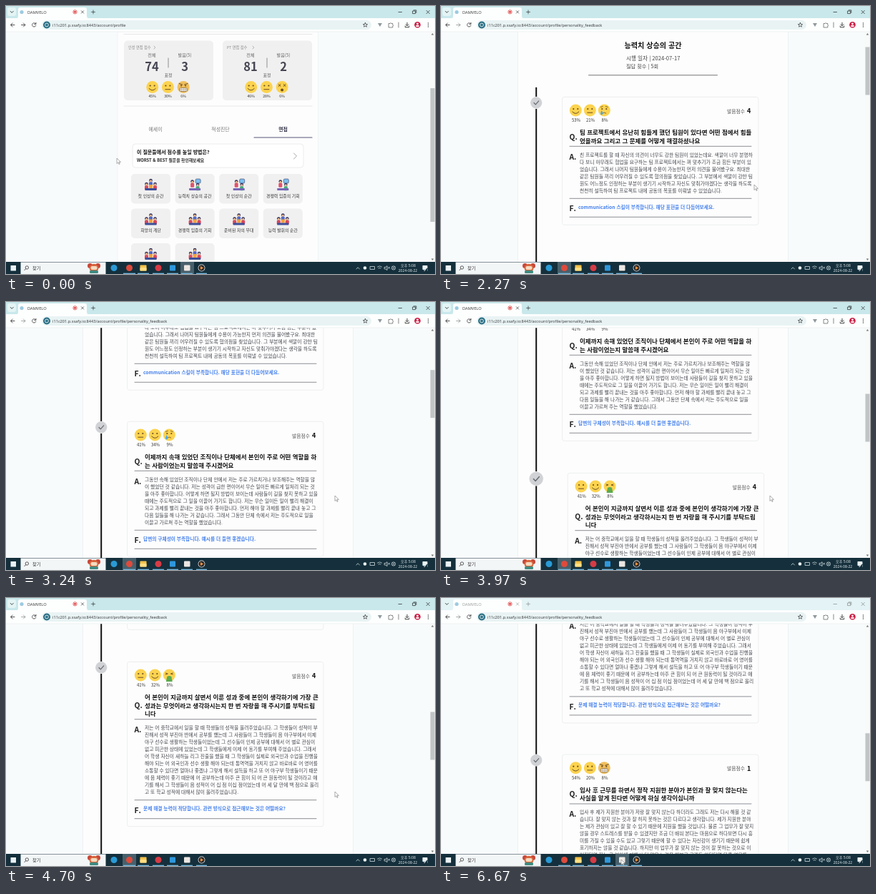
Animation of 600 by 375 pixels, one loop 6.7 s. Source, as an HTML page:

```html
<!DOCTYPE html>
<html lang="ko">
<head>
<meta charset="utf-8">
<style>
html, body { margin: 0; width: 100%; height: 100%; overflow: hidden; background: #fff; }
svg { display: block; width: 600px; height: 375px; font-family: "Noto Sans CJK KR", "Noto Sans CJK", "Noto Sans", sans-serif; }
.ui { font-family: "Open Sans", "Noto Sans CJK KR", sans-serif; }
text { white-space: pre; }
</style>
</head>
<body>
<svg id="stage" viewBox="0 0 600 375"></svg>
<script>
const LOOP = 6700, NAV = 760, LOAD = 1450, BLUR = 6350, BRAND = 'DAMVELO';
const $ = id => document.getElementById(id);

// Drawing helpers; text is placed by its vertical centre.
const text = (x, y, size, str, o = {}) =>
  `<text x="${x}" y="${y + size * .37}" font-size="${size}" font-weight="${o.w || 400}" fill="${o.f || '#333'}" text-anchor="${o.a || 'start'}"${o.id ? ` id="${o.id}"` : ''}>${str.replace(/&/g, '&amp;')}</text>`;
const mid = (x, y, size, str, o = {}) => text(x, y, size, str, { ...o, a: 'middle' });
const rect = (x, y, w, h, fill, r = 0, more = '') =>
  `<rect x="${x}" y="${y}" width="${w}" height="${h}" rx="${r}" fill="${fill}" ${more}/>`;
const dot = (x, y, r, fill, more = '') => `<circle cx="${x}" cy="${y}" r="${r}" fill="${fill}" ${more}/>`;
const line = (d, color = '#444', w = 1, more = '') =>
  `<path d="${d}" fill="none" stroke="${color}" stroke-width="${w}" stroke-linecap="round" stroke-linejoin="round" ${more}/>`;
const group = (id, body, more = '') => `<g id="${id}" ${more}>${body}</g>`;

const INK = '#6b4c24';
const eyes = dot(-3, -2, 1.1, INK) + dot(3, -2, 1.1, INK);
const faces = {
  smile: eyes + line('M-4.5 2Q0 7 4.5 2', INK, 1),
  flat: eyes + line('M-3.5 3.2H3.5', INK, 1),
  cry: eyes + line('M-2.5 4Q0 2 2.5 4M-5-4.5L-2-5.5M5-4.5L2-5.5', INK, .8) +
    '<path d="M-3.5 0Q-7 5.5-3.5 6.5Q-.5 5.5-3.5 0" fill="#4aa9e8"/>',
  angry: rect(-5, 1, 10, 5, '#fff', 1.5, `stroke="${INK}" stroke-width=".6"`) +
    line('M-2.5 1V6M0 1V6M2.5 1V6M-5 3.5H5', INK, .4) + eyes + line('M-6-5L-1.5-3.5M6-5L1.5-3.5', INK, 1),
  dizzy: line('M-5-4L-2-1M-2-4L-5-1M5-4L2-1M2-4L5-1', INK, 1) + dot(0, 4, 2, INK),
  sick: line('M-5-3L-2-2L-5-1M5-3L2-2L5-1', INK, .9) +
    '<path d="M-3 2Q0 0 3 2L4.5 9H-4.5Z" fill="#5cab50"/>'
};
const emoji = (kind, x, y) =>
  `<g transform="translate(${x} ${y})">${dot(0, 0, 8.5, kind === 'angry' ? '#f0bf5c' : '#fcd34f')}${faces[kind]}</g>`;

// Profile page
function scoreCard(x, title, total, voice, kinds, percents) {
  const grey = { f: '#666' }, bold = { w: 700, f: '#454552' };
  return rect(x, 48.5, 125, 83.5, '#f0f0f0', 5) +
    text(x + 6, 58, 5.2, title, { f: '#888' }) + line(`M${x + 42} 56l1.8 2-1.8 2`, '#888', .6) +
    mid(x + 39, 69, 6.2, '전체', grey) + mid(x + 85, 69, 6.2, '발음(5)', grey) +
    line(`M${x + 62} 73v13`, '#777', .8) + mid(x + 39, 84.5, 16.5, total, bold) + mid(x + 85, 84.5, 16.5, voice, bold) +
    mid(x + 62, 97, 6, '표정', { f: '#555' }) +
    kinds.map((k, i) => emoji(k, x + 39.7 + i * 21.7, 113.5) + mid(x + 39.7 + i * 21.7, 126, 5.2, percents[i] + '%')).join('');
}
const person = (x, y, shirt) => dot(x, y, 2.3, '#34335c') + dot(x, y + .7, 1.5, '#f6bd8c') + rect(x - 2.5, y + 2.3, 5, 6, shirt, 1.3);
function badge(x, y, pair) {
  const art = pair
    ? rect(1, -8, 7, 6, '#7cc0f0', 1.5, 'stroke="#34335c" stroke-width=".6"') + person(-3.5, -4.5, '#e0526a') + person(4, 0, '#43a878')
    : person(0, -6, '#5269c8') + person(-6, -1, '#d9485d') + person(6, -1, '#d9485d') + rect(-2.5, 0, 5, 5, '#f4a23c');
  return `<g transform="translate(${x} ${y})">${art}${rect(-8, 5, 16, 3, pair ? '#7567b5' : '#3e4f9a', .6)}</g>`;
}
const labels = ['첫 인상의 순간', '능력치 상승의 공간', '첫 인상의 순간', '경쟁력 입증의 기회', '희망의 계단',
  '경쟁력 입증의 기회', '준비된 자의 무대', '능력 발휘의 순간', '', ''];
const cells = labels.map((s, i) => {
  const x = 175 + i % 4 * 61.6, y = 235 + (i >> 2) * 48.5;
  return rect(x, y, 55, 41.5, '#f0f0f0', 5) + badge(x + 27.5, y + 15, i > 0 && i < 4) + mid(x + 27.5, y + 30.5, 5.9, s);
}).join('');
const profile = rect(0, 36, 600, 322, '#f8fbfc') + rect(156, 36, 280.5, 322, '#fdfdfd', 0, 'stroke="#eceef0" stroke-width=".6"') +
  line('M165 39.5H428M165 140H428', '#e2e2e2', .8) +
  scoreCard(165, '인성 면접 점수', '74', '3', ['smile', 'flat', 'angry'], [45, 30, 6]) +
  scoreCard(303, 'PT 면접 점수', '81', '2', ['smile', 'flat', 'dizzy'], [46, 28, 6]) +
  mid(209, 172, 6.9, '에세이', { f: '#777' }) + mid(300, 172, 6.9, '적성진단', { f: '#777' }) +
  mid(387.5, 172, 6.9, '면접', { w: 700, f: '#333348' }) + line('M347 184H428', '#56567c', 1.2) +
  rect(177, 193, 239, 33, '#fff', 4, 'stroke="#e8e8e8" stroke-width=".8"') +
  text(183, 204.5, 7, '이 질문들에서 점수를 높일 방법은?', { w: 700, f: '#111' }) +
  text(183, 215.5, 5.8, 'WORST & BEST 질문을 확인해보세요', { w: 600, f: '#222' }) +
  line('M402.5 206l4 4-4 4', '#999', .9) + cells;

// Feedback page
const reviews = [
  { top: 197.5, start: LOAD, kinds: ['smile', 'flat', 'cry'], pct: [53, 21, 8], score: '4',
    q: ['팀 프로젝트에서 유난히 힘들게 했던 팀원이 있다면 어떤 점에서 힘들', '었을까요 그리고 그 문제를 어떻게 해결하셨나요'],
    a: ['친 프로젝트를 할 때 자신의 의견이 너무도 강한 팀원이 있었는데요. 색깔이 너무 분명하',
      '다 보니 아무래도 협업을 요구하는 팀 프로젝트에서는 꺼 맞추기가 조금 힘든 부분이 있',
      '었습니다. 그래서 나머지 팀원들에게 수용이 가능한지 먼저 의견을 물어봤구요. 최대한',
      '같은 팀원들 끼리 어우러질 수 있도록 협의점을 찾았습니다. 그 부분에서 색깔이 강한 팀',
      '원도 어느정도 인정하는 부분이 생기기 시작하고 자신도 맞춰가야겠다는 생각을 하도록',
      '천천히 설득하여 팀 프로젝트 내에 공동의 목표를 이뤄낼 수 있었습니다.'],
    f: 'communication 스킬이 부족합니다. 해당 표현을 더 다듬어보세요.' },
  { top: 420.5, start: 2390, kinds: ['flat', 'smile', 'cry'], pct: [41, 34, 9], score: '4',
    q: ['이제까지 속해 있었던 조직이나 단체에서 본인이 주로 어떤 역할을 하', '는 사람이었는지 말씀해 주시겠어요'],
    a: ['그동안 속해 있었던 조직이나 단체 안에서 저는 주로 가르치거나 보조해주는 역할을 많',
      '이 했었던 것 같습니다. 저는 성격이 급한 편이어서 무슨 일이든 빠르게 일처리 되는 것',
      '을 아주 좋아합니다. 어떻게 하면 될지 방법이 보이는데 사람들이 길을 찾지 못하고 있을',
      '때에는 주도적으로 그 일을 이끌어 가기도 합니다. 저는 무슨 일이든 일이 빨리 해결이',
      '되고 과제를 빨리 끝내는 것을 아주 좋아합니다. 먼저 해야 할 과제를 빨리 끝내 놓고 그',
      '다음 일들을 해 나가는 거 같습니다. 그래서 그동안 단체 속에서 저는 주도적으로 일을',
      '이끌고 가르쳐 주는 역할을 했었습니다.'],
    f: '답변의 구체성이 부족합니다. 예시를 더 들면 좋겠습니다.' },
  { top: 654.5, start: 3610, kinds: ['flat', 'smile', 'sick'], pct: [41, 32, 8], score: '4',
    q: ['어 본인이 지금까지 살면서 이룬 성과 중에 본인이 생각하기에 가장 큰', '성과는 무엇이라고 생각하시는지 한 번 자랑을 해 주시기를 부탁드립', '니다'],
    a: ['저는 어 중학교에서 일을 할 때 학생들의 성적을 올려주었습니다. 그 학생들이 성적이 부',
      '진해서 성적 부진아 반에서 공부를 했는데 그 사람들이 그 학생들이 음 야구부에서 이제',
      '야구 선수로 생활하는 학생들이었는데 그 선수들이 인제 공부에 대해서 어 별로 관심이',
      '없고 피곤한 상태에 있었는데 그 학생들에게 이제 어 동기를 부여해 주었습니다. 그래서',
      '어 학생 자신이 새하늘 리그 진출을 했을 때 그 학생들이 실제로 외국인과 수업을 진행을',
      '해야 되는 어 외국인과 선수 생활 해야 되는데 통역역을 거치지 않고 바로바로 어 영어를',
      '소통할 수 있다면 얼마나 좋겠냐 그렇게 해서 설득을 하고 또 어 야구부 학생들이기 때문',
      '에 음 체력이 좋기 때문에 어 공부하는데 아주 큰 힘이 되 어 큰 원동력이 될 것이라고 얘',
      '기를 해서 그 학생들이 음 성적이 어 십 점 이십 점이었는데 어 세 달 만에 백 점으로 올리',
      '고 또 학교 성적에 대해서 많이 올려주었습니다.'],
    f: '문제 해결 능력이 적당합니다. 관련 방식으로 접근해보는 것은 어떨까요?' },
  { top: 929, start: 4890, kinds: ['smile', 'flat', 'angry'], pct: [54, 20, 8], score: '1',
    q: ['입사 후 근무를 하면서 정작 지원한 분야가 본인과 잘 맞지 않는다는', '사실을 알게 된다면 어떻게 하실 생각이십니까'],
    a: ['입사 후 제가 지원한 분야가 저랑 잘 맞지 않는다 하더라도 그래도 저는 다시 해볼 것 같',
      '습니다. 잘 맞지 않는 것과 잘 하지 못하는 것은 다르다고 생각합니다. 제가 지원한 분야',
      '는 제가 관심이 있고 잘 할 수 있기 때문에 지원을 했을 것입니다. 물론 그 업무가 잘 맞지',
      '않을 경우 스트레스를 받을 수 있겠지만 조금 더 배워 본다는 마음으로 하다보면 다시 흥',
      '미를 가질 수 있을 수도 있고 그렇기 때문에 할 수 있다는 자신감이 생기기 때문에 쉽게',
      '포기하지는 않을 것 같습니다. 하지만 이 업무가 잘 맞지 않는 것이 잘 못하는 것으로 이',
      '어진다면 저는 그 분야에 대해서 더 많은 노력을 해보고 그래도 안된다면 다른 업무를'],
    f: '' }
];
function review(r, i) {
  const qEnd = 69 + (r.q.length - 2) * 11.4, a0 = qEnd + 12, aEnd = a0 + r.a.length * 10 + 1;
  const rule = y => line(`M180 ${y}H434`, '#5c5f68', .7);
  const letter = (y, c) => text(179.5, y, 10.3, c, { w: 700, f: '#222' });
  const body = rect(169.5, 0, 274.5, aEnd + 37, '#fdfdfd', 3, 'stroke="#e6e8ea" stroke-width=".7"') +
    r.kinds.map((k, j) => emoji(k, 188.3 + j * 20, 18.7) + mid(189 + j * 20, 32.8, 6, r.pct[j] + '%', { w: 500 })).join('') +
    text(400, 19.8, 6.8, '발음점수', { f: '#555' }) + text(428, 19.5, 9, r.score, { w: 700, f: '#111' }) +
    letter(55.5 + (r.q.length - 2) * 5.7, 'Q.') +
    r.q.map((s, j) => text(194, 49.7 + j * 11.4, 8.5, s, { w: 600, f: '#111' })).join('') + rule(qEnd) +
    letter(a0 + 2.5, 'A.') + r.a.map((s, j) => text(194, a0 + j * 10, 6.75, s, { f: '#44464d' })).join('') + rule(aEnd) +
    letter(aEnd + 14, 'F.') + text(192, aEnd + 12, 6.7, r.f, { w: 600, f: '#4580ec' }) + rule(aEnd + 26);
  const tick = dot(0, 0, 8.6, '#f4f5f6') + dot(0, 0, 8, '#d0d2d5') + line('M-3.2 .2L-.9 2.6L3.5-2.4', '#666a70', 1.2);
  return group('card' + i, body) + group('tick' + i, tick);
}
const nav = [[253, '1차 전형 준비'], [310, '2차 전형 준비'], [390, '프로필'], [427, '로그아웃']];
const feedback = rect(0, 36, 600, 1500, '#f8fbfc') + rect(0, 36, 600, 41, '#fdfdfd') + line('M0 77H600', '#e6eaed', .7) +
  dot(142, 56.5, 5.5, '#8cc5e2') + text(153, 56, 10, BRAND, { w: 700, f: '#111' }) +
  nav.map(([x, s]) => text(x, 56, 6.8, s, { w: 600, f: '#222' })).join('') +
  rect(107.5, 95, 378, 257, '#e2e7ea', 4, 'id="shade"') + rect(108, 94, 377, 257, '#fdfdfd', 4, 'id="panel"') +
  mid(296.5, 125, 10.1, '능력치 상승의 공간', { w: 700, f: '#111' }) +
  text(259, 143, 7.6, '시행 일자 | 2024-07-17', { w: 300, f: '#444' }) +
  text(259, 155, 7.2, '', { w: 300, f: '#444', id: 'count' }) + line('M206.5 167H386.5', '#666', .9) +
  rect(132.2, 184, 2, 54, '#111', 0, 'id="rail"') + reviews.map(review).join('');

// Browser frame and taskbar
const chrome = rect(0, 0, 600, 17.5, '#c9e8eb', 0, 'id="strip"') + rect(2, 2, 12, 12, '#e4f4f5', 3) + line('M6.2 7.4l2 2 2-2', '#333', .9) +
  '<path d="M14 17.5Q17 17 17 14V5Q17 2 20 2H110Q113 2 113 5V14Q113 17 116 17.5Z" fill="#fdfefe"/>' +
  rect(0, 17, 600, 19, '#fdfefe') + dot(22, 8.5, 2.6, '#9dcbe0') +
  dot(96.5, 8.3, 2.6, '#fff', 'stroke="#d33" stroke-width=".8"') + dot(96.5, 8.3, 1.4, '#d33') +
  group('controls', text(30, 8.5, 5.7, BRAND) +
    line('M105.3 6.7l3.4 3.4M108.7 6.7l-3.4 3.4M119.5 8.4h5M122 5.9v5', '#333', .7) +
    line('M549 8.5h4.5M588 6.3l4.4 4.4M592.4 6.3l-4.4 4.4M569 7h3.6v3.6H569ZM570 6V5.8h3.8V9.5', '#222', .7)) +
  line('M12 26.5H6.7M9 24l-2.4 2.5L9 29M41.6 25A2.7 2.7 0 1 0 41.8 27.4M41.9 23.3V25.4H39.8', '#444', .9) +
  line('M21.5 26.5h5.3M24.4 24l2.4 2.5-2.4 2.5', '#444', .9, 'id="forward"') +
  rect(50, 20, 461, 13, '#e9f3f4', 6.5) + dot(57, 26.5, 5, '#2d7186') + dot(57, 26.5, 2.4, 'none', 'stroke="#fff" stroke-width=".8"') +
  text(65, 26.5, 5.65, '', { id: 'url', f: '#333' }) +
  line('M502.5 23.4l.9 2 2.2.2-1.7 1.5.5 2.1-1.9-1.1-1.9 1.1.5-2.1-1.7-1.5 2.2-.2Z', '#333', .7) +
  '<path d="M520 24h6l-3 5Z" fill="#8f999d"/>' + line('M535.5 24.5h1.7q.8-2 1.6 0h2v2q2 .7 0 1.5v2h-5.3ZM549 23v7', '#555', .7) +
  line('M561 23.2v4.3M559 25.7l2 2 2-2M558.3 28v1.8h5.4V28', '#333', .9) + dot(575.5, 26.3, 4.3, '#c91f45') +
  dot(575.5, 25, 1.4, '#fff') + rect(573.1, 27, 4.8, 2, '#fff', 1) +
  dot(590.5, 24, .7, '#333') + dot(590.5, 26.5, .7, '#333') + dot(590.5, 29, .7, '#333') + line('M0 36H600', '#dce7e8', .5);
const apps = dot(151, 366.5, 4.5, '#2a9bd6') + dot(172.5, 366.5, 4.5, '#de4b3c') +
  rect(187.5, 362.5, 9, 8, '#f4c24a', .8) + rect(187.5, 366, 9, 4.5, '#ffdf83', .6) +
  dot(213, 366.5, 4.5, '#d73b45') + rect(229, 362.5, 8, 8, '#2f97dd', 1) + rect(249, 362.5, 8.5, 8, '#ece6e2', 1) +
  dot(273.5, 366.5, 4.9, '#f0f0f0') + dot(273.5, 366.5, 4.2, '#2b2b2b') + '<path d="M272 364l4 2.5-4 2.5Z" fill="#ff943b"/>';
const SKY = '#eaf2f5', BAR = '#15303c', light = { f: SKY };
const taskbar = rect(0, 358, 600, 17, BAR) + rect(6.5, 363, 7.5, 7.5, SKY) +
  rect(20.5, 358.5, 119, 16.5, '#f3f6f7') +
  dot(29.3, 366, 2.2, 'none', 'stroke="#333" stroke-width=".8"') + line('M27.7 367.7L25.8 369.7', '#333', .8) + text(37, 366.5, 6.2, '찾기') +
  dot(117.5, 363.5, 3.5, '#c8473a') + dot(128.5, 363.5, 3.5, '#c8473a') + dot(123, 367, 6.3, '#d8663c') +
  rect(118.5, 364, 9, 5, '#f3dcc0', 2) + rect(117, 370, 12, 4, '#3f8a80', 1.5) +
  rect(163, 358, 19, 17, '#48606b', 0, 'id="active"') +
  [[164, 17], [184, 16], [205, 16], [225, 16], [245, 16], [266, 15]].map(([x, w]) => rect(x, 373.7, w, 1.3, '#76b9e0')).join('') + apps +
  line('M490 368l2.2-2.3 2.2 2.3M509.5 364.5h6v4h-6ZM519.5 365q3-2.4 6 0M521 367q1.5-1.2 3 0M529.5 365.5h1.5l2-1.8v6l-2-1.8h-1.5ZM534.5 365.2l2.2 2.2M536.7 365.2l-2.2 2.2', SKY, .7) +
  dot(502, 366.5, 2.3, SKY) + dot(542, 366.5, 2.6, 'none', `stroke="${SKY}" stroke-width=".7"`) + line('M540.5 365l3 3M543.5 365l-3 3', SKY, .6) +
  mid(562.5, 362.8, 5.1, '오후 5:08', light) + mid(562, 370.5, 5.1, '2024-08-22', light) +
  rect(582.5, 363, 7, 6, SKY, .7) + line('M585 369v2l2-2', SKY, .7) + dot(589.5, 369.5, 2.5, BAR) + mid(589.5, 369.5, 4, '1', light);
const scrollbar = rect(593, 36, 7, 322, '#f8f9f9') + rect(593.5, 43, 6, 10, '#c1c4c5', 0, 'id="thumb"') +
  '<path d="M594.7 40.5l1.8-2.4 1.8 2.4ZM594.7 353.5l1.8 2.4 1.8-2.4Z" fill="#777"/>';
const arrow = '<path d="M0 0V7.5L1.8 5.8L3 8.5L4.2 8L3 5.4H5.4Z" fill="#fff" stroke="#777" stroke-width=".6"/>';

$('stage').innerHTML =
  '<clipPath id="view"><rect y="36" width="600" height="322"/></clipPath>' +
  `<g clip-path="url(#view)">${group('profile', profile)}${group('feedback', feedback)}${scrollbar}</g>` +
  group('frame', chrome + taskbar, 'class="ui"') +
  group('arrow', arrow) + group('beam', line('M-1.6-3.5H1.6M0-3.5V3.5M-1.6 3.5H1.6', '#222', .8));

// Motion
const smooth = u => u * u * (3 - 2 * u), linear = u => u;
function along(keys, t, ease, col = 1) {
  const i = keys.findIndex(k => k[0] > t);
  if (i < 0) return keys[keys.length - 1][col];
  if (!i) return keys[0][col];
  const a = keys[i - 1], b = keys[i];
  return a[col] + (b[col] - a[col]) * ease((t - a[0]) / (b[0] - a[0]));
}
const scrollKeys = [[1850, 0], [2270, 70], [3240, 253], [3970, 415], [4700, 565], [5430, 710]];
const mouseKeys = [[60, 155, 213], [650, 269, 254.5], [1400, 269, 254.5], [2050, 438, 250], [2500, 438, 250],
  [3050, 460, 271], [5640, 460, 271], [6200, 252, 366]];
const show = (id, on) => $(id).setAttribute('visibility', on ? 'inherit' : 'hidden');
const set = (id, name, value) => $(id).setAttribute(name, value);
const easeOut = u => 1 - (1 - u) ** 2.2;
const bounce = (age, from, over, rest) => along([[0, from], [360, over], [600, rest]], age, easeOut);

function draw(t) {
  const onFeedback = t >= NAV, loaded = t >= LOAD, blurred = t >= BLUR, y = along(scrollKeys, t, linear);
  show('profile', !onFeedback);
  show('feedback', onFeedback);
  set('feedback', 'transform', `translate(0 ${-y})`);
  $('url').textContent = 'i11c201.p.ssafy.io:8443/account/profile' + (onFeedback ? '/personality_feedback' : '');
  $('count').textContent = `질답 횟수 | ${loaded ? 5 : 0}회`;
  set('forward', 'opacity', onFeedback ? .5 : 1);
  set('strip', 'fill', blurred ? '#e4f3f5' : '#c9e8eb');
  set('controls', 'opacity', blurred ? .5 : 1);
  set('panel', 'height', loaded ? 1420 : 257);
  set('shade', 'height', loaded ? 1420 : 257);
  set('rail', 'height', loaded ? 1300 : 54);

  reviews.forEach((r, i) => {
    const age = t - r.start, alive = age >= 0, fade = Math.min(1, Math.max(0, age) / 360);
    for (const id of ['card' + i, 'tick' + i]) {
      show(id, alive);
      set(id, 'opacity', fade);
    }
    set('card' + i, 'transform', `translate(${bounce(age, -39, 7.8, 0)} ${r.top})`);
    set('tick' + i, 'transform', `translate(133.2 ${r.top + 8}) scale(${bounce(age, .5, 1.2, 1)})`);
  });

  set('thumb', 'y', !onFeedback ? 115 : 43 + y * .206);
  set('thumb', 'height', !onFeedback ? 187 : loaded ? 67 : 308);
  set('active', 'x', t > 650 && !blurred ? 163 : 244);

  const place = `translate(${along(mouseKeys, t, smooth)} ${along(mouseKeys, t, smooth, 2)})`;
  const beam = onFeedback && t < 1420;
  show('arrow', !beam);
  show('beam', beam);
  set('arrow', 'transform', place);
  set('beam', 'transform', place);
}
function tick() {
  draw(performance.now() % LOOP);
  requestAnimationFrame(tick);
}
tick();
</script>
</body>
</html>
```
